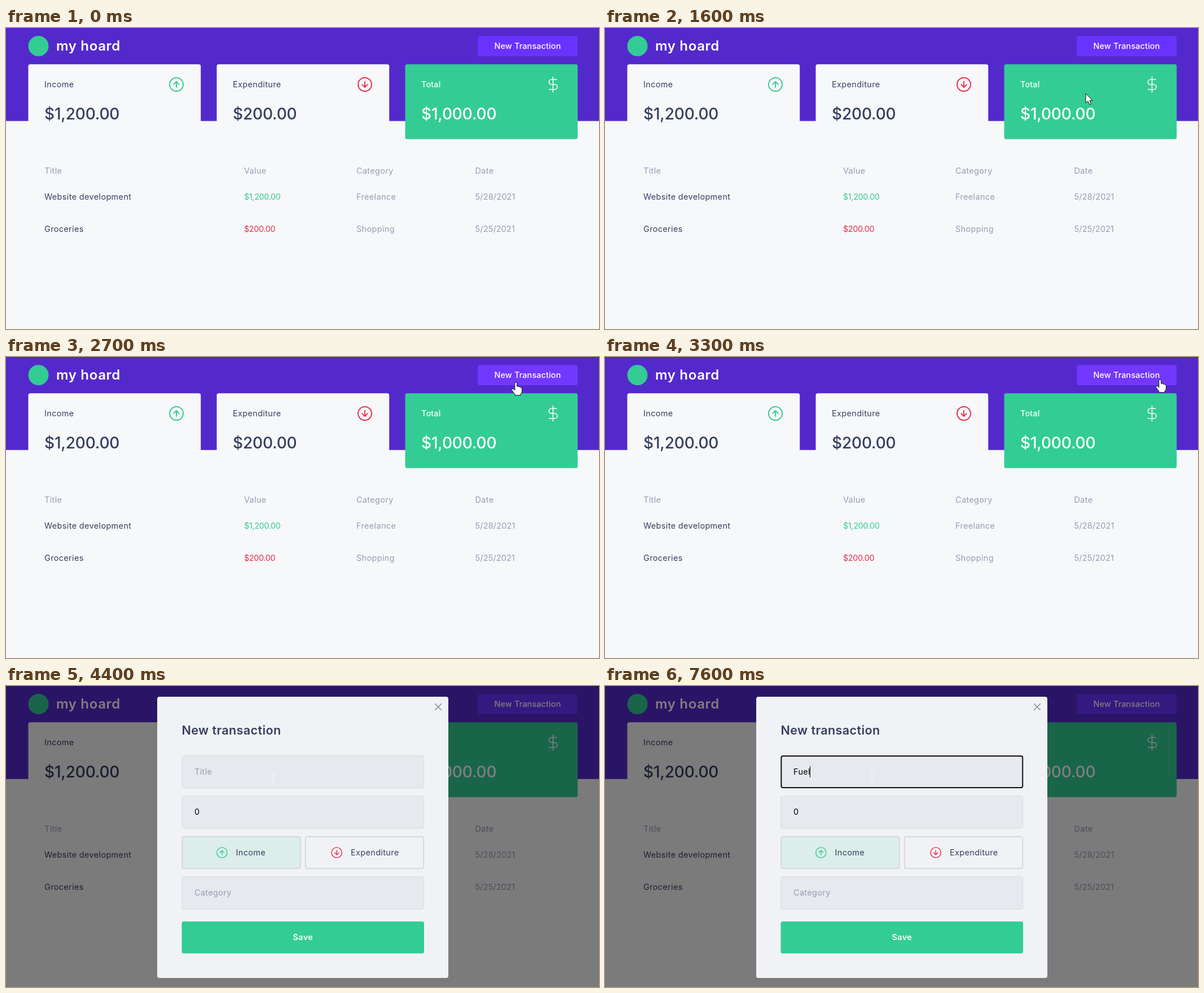
An HTML page that plays this animation: 1051 px wide and 533 px high, repeating every 8000 ms.

```html
<!DOCTYPE html>
<html lang="en">
<head>
<meta charset="utf-8">
<title>Money tracker</title>
<style>
  html, body { margin: 0; width: 100%; height: 100%; overflow: hidden; background: #f7f8fa; }
  svg { display: block; width: 100%; height: 100%; }

  text {
    font: 400 14.4px Inter, "Open Sans", sans-serif;
    font-optical-sizing: none;
    letter-spacing: .027em;
    fill: #363f5f;
  }
  .muted { fill: #969cb3; }
  .money { letter-spacing: -.025em; }
  .date { letter-spacing: .015em; }
  .big { font-size: 28px; font-weight: 500; letter-spacing: -.006em; }
  .brand { font-size: 24px; font-weight: 600; }
  .heading { font-size: 21.5px; font-weight: 600; letter-spacing: .02em; }
  .action { font-weight: 500; letter-spacing: .01em; }
  .save { font-weight: 600; }
  .mid { text-anchor: middle; }
  .white { fill: #fff; }
  .black { fill: #000; }
  .in { fill: #33cc95; }
  .out { fill: #e52e4d; }

  .line { fill: none; stroke-linecap: round; stroke-linejoin: round; }
  .green { stroke: #33cc95; }
  .red { stroke: #e52e4d; }
  .field { fill: #e7e9ee; stroke: #d7d8dc; }
  .choice { stroke: #cfd1d6; stroke-width: 1.5; }

  .button, .modal, .focus, .hint, .caret, .blink, .cursor, .arrow, .hand, .beam {
    animation: 8s step-end infinite;
  }
  .button { animation-name: hover; }
  .modal { animation-name: open; }
  .focus { animation-name: focus; }
  .hint { animation-name: hint; }
  .caret { animation-name: type; }
  .blink { animation-name: blink; }
  .cursor { animation-name: move; }
  .arrow { animation-name: arrow; }
  .hand { animation-name: hand; }
  .beam { animation-name: beam; }

  @keyframes hover {
    0% { fill: #6933ff; }
    27.5% { fill: #6e36ff; }
    28.75% { fill: #7137ff; }
    30% { fill: #7338ff; }
    47.5%, 100% { fill: #6933ff; }
  }
  @keyframes open { 0% { visibility: hidden; } 47.5%, 100% { visibility: visible; } }
  @keyframes focus { 0% { opacity: 0; } 60%, 100% { opacity: 1; } }
  @keyframes hint { 0% { opacity: 1; } 81.25%, 100% { opacity: 0; } }
  @keyframes type {
    0% { transform: translateX(334px); }
    81.25% { transform: translateX(342px); }
    88.75% { transform: translateX(350.5px); }
    93.75% { transform: translateX(359px); }
    95%, 100% { transform: translateX(362.5px); }
  }
  @keyframes blink {
    0%, 65%, 78.75%, 87.5% { opacity: 0; }
    60%, 72.5%, 81.25%, 88.75%, 100% { opacity: 1; }
  }
  /* The pointer advances once every 100 ms */
  @keyframes move {
    0% { transform: translate(0, 60px); }
    3.75% { transform: translate(0, 60px); animation-timing-function: steps(5, start); }
    10% { transform: translate(134px, 305px); }
    12.5% { transform: translate(134px, 305px); animation-timing-function: steps(5, start); }
    18.75% { transform: translate(821px, 165px); }
    20% { transform: translate(852px, 116px); }
    21.25% { transform: translate(852px, 116px); animation-timing-function: steps(6, start); }
    28.75% { transform: translate(904px, 45px); }
    36.25% { transform: translate(904px, 45px); animation-timing-function: steps(5, start); }
    42.5% { transform: translate(984px, 40px); }
    52.5% { transform: translate(984px, 40px); animation-timing-function: steps(3, start); }
    56.25%, 100% { transform: translate(473px, 162px); }
  }
  @keyframes arrow {
    0%, 27.5%, 55% { opacity: 0; }
    3.75%, 47.5% { opacity: 1; }
    100% { opacity: 0; }
  }
  @keyframes hand { 0%, 47.5%, 100% { opacity: 0; } 27.5% { opacity: 1; } }
  @keyframes beam { 0% { opacity: 0; } 55%, 100% { opacity: 1; } }
</style>
</head>
<body>
<svg viewBox="0 0 1051 533" preserveAspectRatio="none">
  <defs>
    <g id="up" class="line">
      <circle r="12"/>
      <path d="M0 5V-5M-4.8 -.2L0 -5L4.8 -.2"/>
    </g>
    <g id="dollar" class="line" stroke="#fff">
      <path d="M0 -13.5V13.5M6.5 -8.8H-2.8a4.4 4.4 0 0 0 0 8.8H3.2a4.4 4.4 0 0 1 0 8.8H-7"/>
    </g>
  </defs>

  <rect width="1051" height="533" fill="#f7f8fa"/>
  <rect width="1051" height="164.7" fill="#5429cc"/>
  <circle cx="57.5" cy="32" r="18" fill="#33cc95"/>
  <text class="brand white" x="89" y="40">my hoard</text>
  <rect class="button" x="836.3" y="14.2" width="176.7" height="35.8" rx="3.5" fill="#6933ff"/>
  <text class="action mid white" x="924.5" y="37">New Transaction</text>

  <g fill="#f7f8fa">
    <rect x="39.5" y="64.3" width="305.7" height="132.5" rx="3.5"/>
    <rect x="373.5" y="64.3" width="305.7" height="132.5" rx="3.5"/>
    <rect x="707.5" y="64.3" width="305.7" height="132.5" rx="3.5" fill="#33cc95"/>
  </g>
  <text x="68" y="105">Income</text>
  <text x="402" y="105">Expenditure</text>
  <text class="action white" x="736" y="105">Total</text>
  <text class="big" x="68" y="162">$1,200.00</text>
  <text class="big" x="402" y="162">$200.00</text>
  <text class="big white" x="736" y="162">$1,000.00</text>
  <use href="#up" class="green" stroke-width="1.9" transform="translate(302 100)"/>
  <use href="#up" class="red" stroke-width="1.9" transform="translate(636 100) scale(1 -1)"/>
  <use href="#dollar" stroke-width="1.6" transform="translate(969.5 100)"/>

  <g>
    <text class="muted" x="68" y="258">Title</text>
    <text class="muted" x="422" y="258">Value</text>
    <text class="muted" x="621" y="258">Category</text>
    <text class="muted" x="831.5" y="258">Date</text>

    <text x="68" y="304">Website development</text>
    <text class="money in" x="422" y="304">$1,200.00</text>
    <text class="muted" x="621" y="304">Freelance</text>
    <text class="muted date" x="831.5" y="304">5/28/2021</text>

    <text x="68" y="361">Groceries</text>
    <text class="money out" x="422" y="361">$200.00</text>
    <text class="muted" x="621" y="361">Shopping</text>
    <text class="muted date" x="831.5" y="361">5/25/2021</text>
  </g>

  <g class="modal">
    <rect width="1051" height="533" opacity=".5"/>
    <rect x="268" y="19" width="516" height="498" rx="4" fill="#f0f2f5"/>
    <path class="line" stroke="#92949b" stroke-width="1.6" d="M760.5 31.5l11 11m0 -11l-11 11"/>
    <text class="heading" x="311.5" y="85.5">New transaction</text>

    <rect class="field" x="312" y="123.5" width="428.5" height="57" rx="3.5"/>
    <rect class="field" x="312" y="195" width="428.5" height="57" rx="3.5"/>
    <rect class="field" x="312" y="338" width="428.5" height="57" rx="3.5"/>
    <text class="black" x="334" y="228">0</text>
    <text class="muted" x="334" y="371">Category</text>

    <rect class="choice" x="312.2" y="266.7" width="209.6" height="56.2" rx="3.5" fill="#dcedea"/>
    <rect class="choice" x="530.7" y="266.7" width="209.6" height="56.2" rx="3.5" fill="none"/>
    <use href="#up" class="green" stroke-width="1.9" transform="translate(382.8 295) scale(.76)"/>
    <use href="#up" class="red" stroke-width="1.9" transform="translate(586.2 295) scale(.76 -.76)"/>
    <text x="407.5" y="300">Income</text>
    <text x="611" y="300">Expenditure</text>

    <rect x="311.5" y="417" width="429.5" height="56.5" rx="3.5" fill="#33cc95"/>
    <text class="save mid white" x="526.3" y="450">Save</text>

    <text class="black" x="334" y="157">Fuel</text>
    <!-- The cover hides letters that have not been typed yet -->
    <g class="caret">
      <rect y="140" width="45" height="24" fill="#e7e9ee"/>
    </g>
    <text class="muted hint" x="334" y="157">Title</text>
    <g class="caret">
      <rect class="blink" y="142" width="1" height="20"/>
    </g>
    <rect class="focus" x="312.4" y="124" width="427.8" height="56" rx="3" fill="none" stroke="#101014" stroke-width="2"/>
  </g>

  <g class="cursor">
    <path class="arrow" d="M0 0V17L4 13.4L6.7 19.5L9.5 18.2L6.9 12.3H12.3Z" fill="#fff" stroke="#111" stroke-linejoin="round"/>
    <g class="hand" fill="#fff" stroke="#111" stroke-linejoin="round">
      <path d="M-2.2 1.5Q-2.2 0 -.3 0Q1.6 0 1.6 1.6V7.2Q3.8 6 5.2 8Q7.2 7 8.2 9Q10.5 8.4 10.5 11V15.5Q10.3 19 8 20.5V22.8H-2V21Q-5 17.5 -7.6 13.3Q-7.4 10.2 -4.2 11.8L-2.2 13.8Z"/>
    </g>
    <path class="beam line" stroke="#f5f6f8" stroke-width="1.3" d="M-4.5 -8.5H-1.5L0 -7.5L1.5 -8.5H4.5M0 -7.5V7.5M-4.5 8.5H-1.5L0 7.5L1.5 8.5H4.5"/>
  </g>
</svg>
</body>
</html>
```
